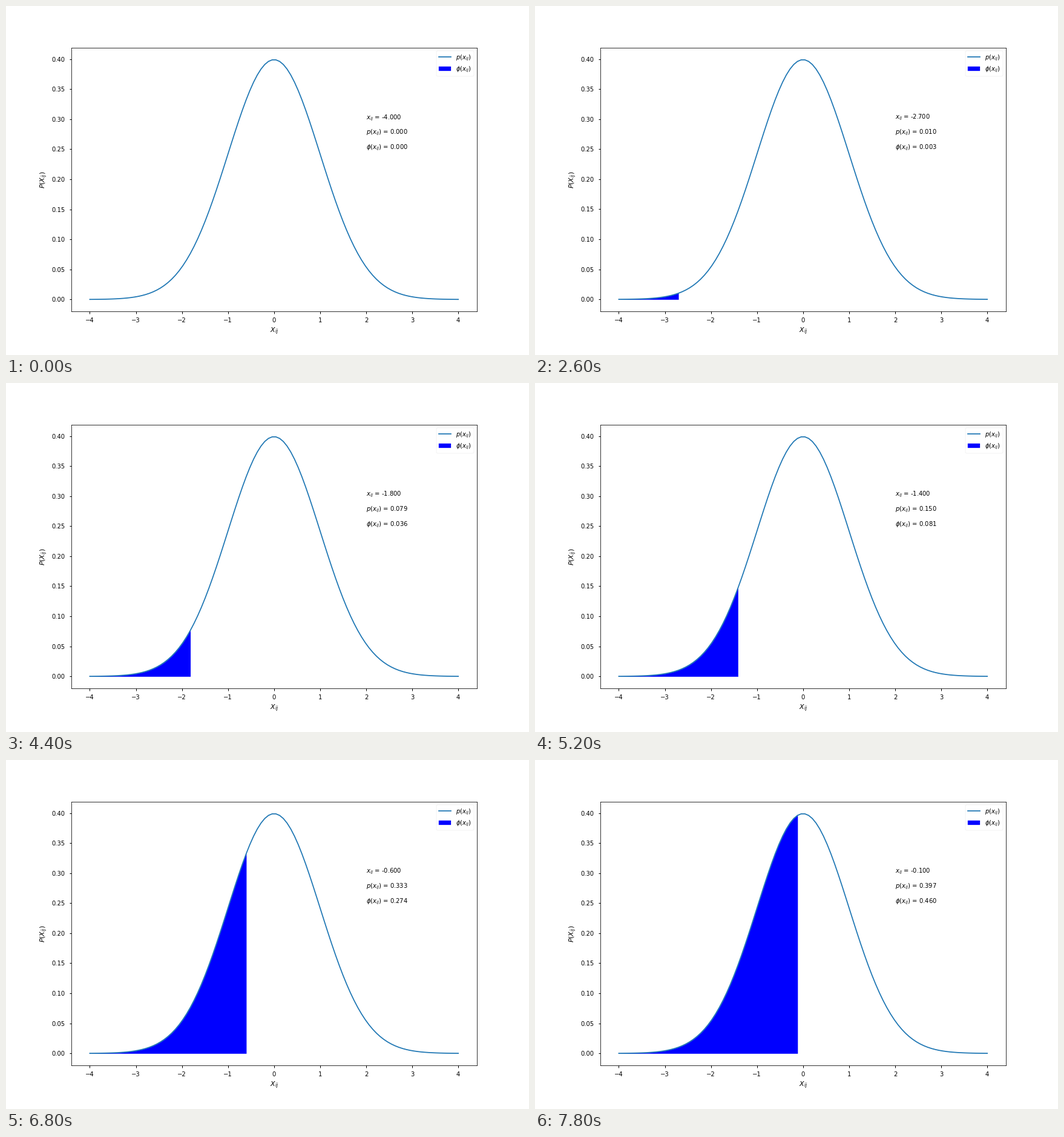
Recreate the animation shown at these times as a matplotlib script. Size 864 by 576 pixels, loop 8 s.

```python
import math

import matplotlib.pyplot as plt
import numpy as np
from matplotlib.animation import FuncAnimation

FRAMES = 40
INTERVAL = 200
START, STEP = -4.0, 0.1

plt.rcParams.update({
    "font.family": "DejaVu Sans",
    "font.size": 10,
    "axes.labelsize": 11,
    "xtick.labelsize": 10,
    "ytick.labelsize": 10,
    "legend.fontsize": 10,
    "lines.linewidth": 1.75,
    "patch.linewidth": 0.3,
    "xtick.major.width": 1,
    "ytick.major.width": 1,
    "xtick.major.pad": 7,
    "ytick.major.pad": 7,
    "figure.subplot.bottom": 0.125,
})


def pdf(x):
    return np.exp(-x ** 2 / 2) / math.sqrt(2 * math.pi)


def cdf(x):
    return (1 + math.erf(x / math.sqrt(2))) / 2


fig, ax = plt.subplots(figsize=(12, 8), dpi=72)
grid = np.linspace(-4, 4, 100)
density = pdf(grid)


def draw(i):
    x = START + STEP * i
    ax.clear()
    ax.plot(grid, density, label=r"$p(x_{ij})$")
    # The filled area takes part in autoscaling once it is not empty.
    ax.fill_between(grid, density, where=grid < x, color="blue",
                    label=r"$\phi(x_{ij})$")
    ax.set_xlabel(r"$X_{ij}$")
    ax.set_ylabel(r"$P(X_{ij})$")
    ax.text(2, 0.3, rf"$x_{{ij}}$ = {x:.3f}")
    ax.text(2, 0.275, rf"$p(x_{{ij}})$ = {pdf(x):.3f}")
    ax.text(2, 0.25, rf"$\phi(x_{{ij}})$ = {cdf(x):.3f}")
    ax.legend(loc="upper right")
    return []


anim = FuncAnimation(fig, draw, frames=FRAMES, interval=INTERVAL,
                     init_func=lambda: draw(0), repeat=True, repeat_delay=0)
plt.show()
```
